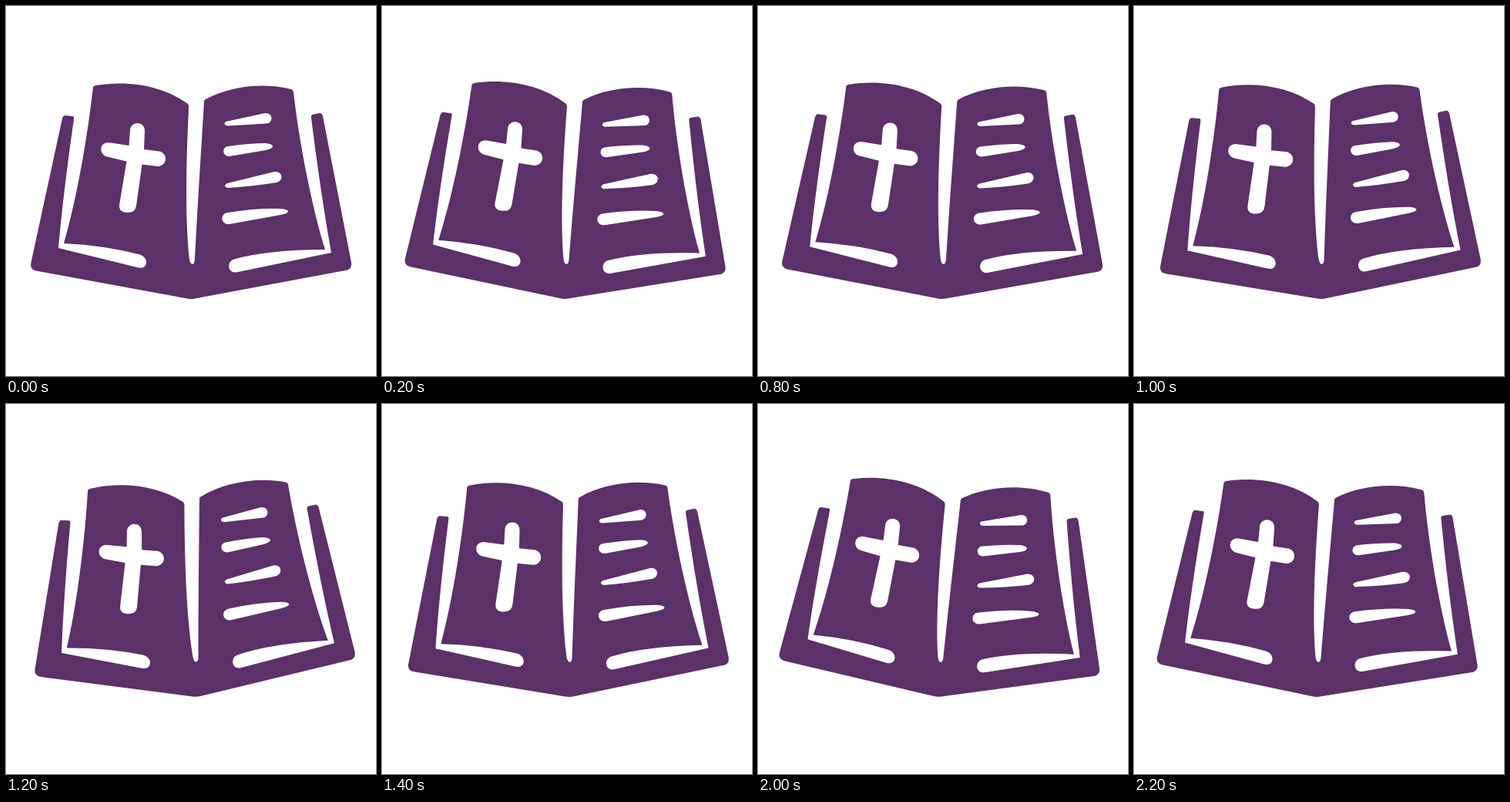
These frames come from a looping animation (480x480 px, 2.4 s). An HTML page with a canvas:

```html
<!DOCTYPE html>
<html lang="en">
<head>
<meta charset="utf-8">
<title>Rocking book</title>
<style>
html, body { margin: 0; width: 100%; height: 100%; overflow: hidden; background: #fff; }
canvas { display: block; width: 480px; height: 480px; }
</style>
</head>
<body>
<canvas id="stage" width="480" height="480"></canvas>
<script>
const ctx = document.getElementById('stage').getContext('2d');
const PURPLE = '#5c3068';
const STEP = 200;

// Tilt in degrees for the first half of the loop; the second half mirrors it.
const HALF = [0, 1.5, 2.9, 1.6, 0.6, -1.1, -3];

const book = new Path2D(`
  M77 142 L86 143 Q89 143 88 147 Q74 245 68 314
  L172 339.5 C184 342 186 327 174 322.5 Q128 310.5 75 308
  C92 250 106 168 113 105 Q114 103.5 117 103
  C158 96 203 103 236 127 Q237.5 129 237 133
  C233 215 233 275 237 321 Q238 335 241.5 335 Q245 335 245 326
  C248.5 258 253 190 257 124 Q257 122 259 121
  C290 104 334 99 370 108 Q373 109 373 112
  C380 174 396 258 414 316
  Q340 316 296 328.5 C286 331 287 347 299 345.5
  L422 320 Q408 242 396 145 Q395 141 399 140.5
  L407 139 Q410 139 411 143
  L448 333 Q449 340 443 342.5
  L245 379.5 Q240 380.5 235 379.5
  L39 343.5 Q32 342 32 335
  L73 146 Q74 142 77 142 Z`);

const cutouts = new Path2D(`
  M161 161 C162 149 180 149 180 162 L179 186 L199 188.5
  C210 191 210 207 197 208 L176.5 205.5 L169 259
  Q168 268 158 268 Q146 268 147 258 L156.5 201.5 L131 195.5
  C120 192 121 177 133 177 L159.5 181 Z
  M285 150 L336 139 C347 138 347 152 338 152.5 L287 155.5 Q281 154 285 150 Z
  M288 182 Q315 178 337 178 Q346 179 346 182 Q346 185 337 187
  L290 195 C280 195 280 183 288 182 Z
  M287 230 L348 215 C360 214 360 227 351 229 Q320 234 287 236 Q281 233 287 230 Z
  M288 268 Q325 262 357 263 Q366 264 366 266.5 Q366 269 356 271
  L290 283 C278 284 277 269 288 268 Z`);

function tiltAt(ms) {
  const i = Math.floor(ms / STEP) % 12;
  return HALF[i > 6 ? 12 - i : i];
}

function draw(ms) {
  ctx.setTransform(1, 0, 0, 1, 0, 0);
  ctx.fillStyle = '#fff';
  ctx.fillRect(0, 0, 480, 480);
  ctx.translate(240, 240);
  ctx.rotate(tiltAt(ms) * Math.PI / 180);
  ctx.translate(-240, -240);
  ctx.fillStyle = PURPLE;
  ctx.fill(book);
  ctx.fillStyle = '#fff';
  ctx.fill(cutouts);
}

const start = performance.now();
function tick() {
  draw(performance.now() - start);
  requestAnimationFrame(tick);
}
tick();
</script>
</body>
</html>
```
